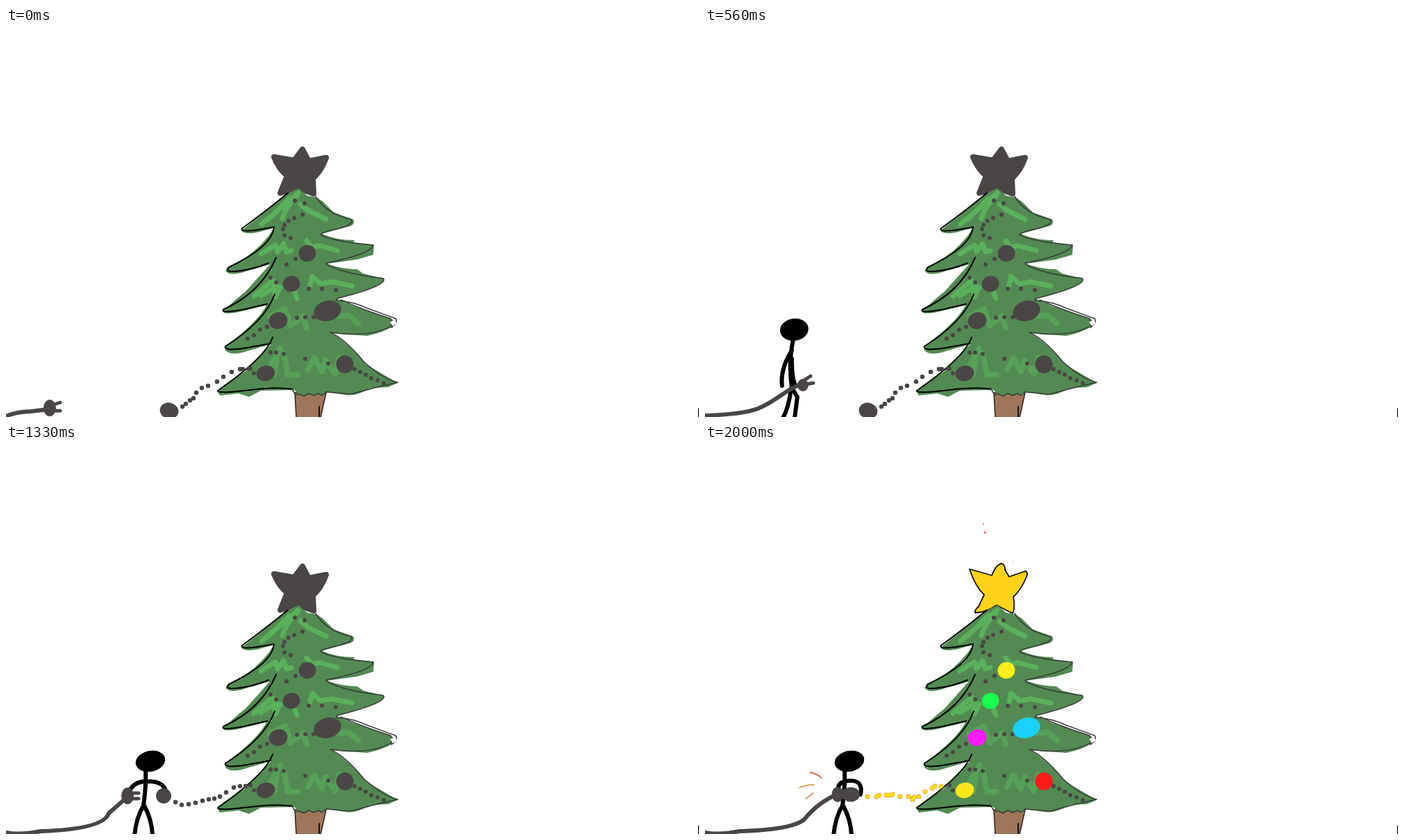
An HTML page that plays this animation: 998x561 px, repeating every 3 s.

```html
<!DOCTYPE html>
<html lang="en">
<head>
<meta charset="utf-8">
<title>Plugging in the tree</title>
<style>
html, body { margin: 0; width: 100%; height: 100%; overflow: hidden; background: #fff; }
svg { display: block; width: 998px; height: 561px; }
path { fill: none; stroke-linecap: round; stroke-linejoin: round; }
.dark { stroke: #4a4645; }
.shape { fill: #4a4645; }
</style>
</head>
<body>
<svg id="stage" viewBox="0 0 998 561"></svg>
<script>
const LOOP = 3000;
const GREY = '#4a4645';
const stage = document.getElementById('stage');

function add(parent, tag, attrs = {}) {
  const el = document.createElementNS('http://www.w3.org/2000/svg', tag);
  for (const key in attrs) el.setAttribute(key, attrs[key]);
  return parent.appendChild(el);
}
const line = (parent, d, stroke, width) =>
  add(parent, 'path', { d, stroke, 'stroke-width': width });
const shape = (parent, d, fill, stroke = 'none', width = 0) =>
  add(parent, 'path', { d, style: `fill:${fill}`, stroke, 'stroke-width': width });
const blob = (parent, [cx, cy, rx, ry, turn = 0], fill) =>
  add(parent, 'ellipse', { cx, cy, rx, ry, fill, transform: `rotate(${turn} ${cx} ${cy})` });
const dots = (parent, points, color, size) =>
  line(parent, points.split(' ').map(p => `M${p}h.01`).join(''), color, size);

// A group that is visible only from one time to another.
function during(from, to) {
  const group = add(stage, 'g');
  group.animate([
    { offset: 0, opacity: from === 0 ? 1 : 0, easing: 'step-end' },
    { offset: from / LOOP, opacity: 1, easing: 'step-end' },
    { offset: to / LOOP, opacity: to === LOOP ? 1 : 0, easing: 'step-end' },
    { offset: 1, opacity: to === LOOP ? 1 : 0 }
  ], { duration: LOOP, iterations: Infinity });
  return group;
}

function drawStars() {
  shape(during(0, 1780),
    'M427 175L436 192L461 187Q455 205 442 217L443 239L421 231L395 238L405 213Q393 204 386 186L415 191Z',
    GREY, GREY, 8);
  shape(during(1780, LOOP),
    'M381 179L413 188Q420 171 428 171Q432 173 432 180L438 190L461 182Q466 183 463 190Q456 208 444 219Q447 235 443 243L420 231Q404 242 389 242Q388 238 394 233L402 216Q389 204 381 179Z',
    '#ffd21a', '#111', 1.8);
}

function drawTree() {
  const tree = add(stage, 'g');
  shape(tree, 'M416 526L418 562H453L461 526Z', '#a0765a', '#2b2422', 1.5);
  line(tree, 'M451 546V562', '#111', 2);
  shape(tree, `M421 231L434 242L447 244L456 250L472 266L500 276Q505 285 490 287L455 297Q475 306 502 306L500 310L530 313
    L529 327L505 334L462 340Q485 348 506 348L514 354L545 362Q546 370 510 380L477 391L500 401L556 420L563 426
    Q548 438 520 444L468 440Q490 452 520 486L564 512L550 518L525 519Q504 532 488 529L462 525L456 530L450 527
    L444 531L437 527L430 531L422 528L415 522L367 523L350 532L335 527L308 530Q302 525 314 515L345 495L368 470L382 456
    L350 465Q325 474 316 465Q314 459 330 448Q365 420 375 400L345 407Q316 415 312 409Q330 392 345 380L380 341
    L345 351Q322 359 316 350Q322 343 345 331Q372 312 386 288L365 294Q343 299 339 292L365 272L390 250L407 238Z`, '#538a53');

  const bright = [
    'M421 238Q395 260 368 283M420 241Q403 257 398 275M408 246L379 275M424 254L435 263L461 276',
    'M367 326L388 313L391 323L400 311L404 323L411 321M433 307L440 316L452 314L477 321',
    'M357 387L384 364L388 388L395 374M367 386L390 372M414 377L419 390M438 371L441 358L453 369L469 366L498 372'
  ];
  const soft = [
    'M404 410L410 430M414 426L428 415L433 432M478 416L493 414L507 426',
    'M374 499L395 462M391 469L386 500M400 469L406 500L420 500',
    'M435 493L444 476L455 496L460 479L474 499L480 475M380 416L402 405'
  ];
  soft.forEach(d => line(tree, d, '#57a057', 8));
  bright.forEach(d => line(tree, d, '#5bb05c', 7));

  const left = [
    'M406 238Q372 266 340 289Q335 297 386 287',
    'M386 287Q384 315 321 345Q314 352 330 351Q354 349 378 339',
    'M389 331Q368 381 313 406Q309 412 342 406L376 398',
    'M387 384Q372 424 316 459Q313 466 342 462L381 455',
    'M384 446Q374 475 305 523Q303 528 352 522Q392 517 412 521'
  ];
  const right = [
    'M446 243Q461 268 497 276Q502 283 480 289Q455 294 453 298Q470 308 529 313Q526 326 461 339',
    'M461 340Q482 354 543 361Q552 371 477 390L475 393Q499 394 520 404L561 419Q565 425 555 432',
    'M482 392Q510 405 554 419L555 428L562 425Q532 448 467 439',
    'M467 439Q489 449 515 481Q542 506 564 511Q531 518 497 528L461 525',
    'M411 519L417 529L423 528L429 531L436 527L443 530L450 527L455 530L461 525'
  ];
  left.forEach(d => line(tree, d, '#000', 2));
  right.forEach(d => line(tree, d, '#39413a', 1.6));
  shape(tree, 'M553 424L560 421L563 426L557 430Z', '#fff');

  dots(tree, '416,249 430,253 427,269 415,274 407,278 401,284 399,290 401,299 410,303 417,333 404,341 381,360 389,367 436,376 455,376 475,378 419,418 431,417 443,417', GREY, 6);
  dots(tree, '376,431 366,435 357,443 348,448 381,468 389,468 400,470 431,477 464,484 502,492 510,496 518,500 526,505 535,508 544,512 357,498 352,491', GREY, 6);
  line(stage, 'M997.5 549V561', '#111', 1.5);
}

function drawBaubles() {
  const baubles = [
    [434, 325, 12.5, 12, '#ffee1a'], [411, 369, 12.5, 11.5, '#1aff50'],
    [392, 422, 13.5, 12, '#ff1aff'], [463, 408, 20, 14.5, '#1ad1ff'],
    [374, 498, 13.5, 11, '#ffe61a'], [488, 485, 12.5, 13, '#ff1a1a']
  ];
  const off = during(0, 1670), on = during(1670, LOOP);
  for (const [x, y, rx, ry, color] of baubles) {
    blob(off, [x, y, rx, ry, -15], GREY);
    blob(on, [x, y, rx, ry, -15], color);
  }
}

const FLOOR_CABLE = 'M0 560Q16 553 35 553L60 550';
const FLOOR_PLUG = { cable: FLOOR_CABLE, plug: [63, 548, 9, 12], prongs: 'M66 544L78 540M66 552H78' };
const STAND = 'M201 470Q202 490 198 520Q188 536 185 563M199 520Q210 540 211 563';
const LOW_SOCKET = [235, 552, 13.5, 11.5, 15];
const LOW_CHAIN = '350,491 341,492 337,492 325,496 313,503 304,510 291,516 282,519 274,526 270,534 265,537 259,542 254,546';
const HIGH_CHAIN = '254,524 262,528 269,528 278,524 291,516 299,511 308,507 317,501 328,494 332,492 337,492 345,492';
const LEVEL_CHAIN = '234,507 247,507 251,505 261,505 266,505 270,504 281,507 293,507 299,511 301,508 308,507 317,500 327,495 331,492 340,492';
const JOINED = {
  head: [208, 456, 21.5, 15, -12],
  limbs: STAND + 'M199 486Q191 488 192 498M201 485Q229 480 224 504',
  cable: 'M0 559Q20 563 50 557Q125 555 143 540Q162 516 190 504',
  plug: [191, 504, 8.5, 11], prongs: 'M194 500H205M194 508H205',
  socket: [210, 504, 13, 10.5], chain: LEVEL_CHAIN
};

const poses = [
  { at: 0, ...FLOOR_PLUG },
  { at: 110, ...FLOOR_PLUG, head: [2, 451, 17, 18],
    limbs: 'M0 467L-4 520M0 476Q14 495 15 518M-4 520L8 543L10 563' },
  { at: 220, ...FLOOR_PLUG, head: [29.5, 449, 17.5, 18.5],
    limbs: 'M28 467Q27 495 22 521M26 474Q9 500 8 520M28 479Q33 505 42 517M23 520Q21 549 11 563M23 521L38 548L39 563' },
  { at: 330, ...FLOOR_PLUG, head: [68, 455, 18, 17],
    limbs: 'M63 471Q55 495 54 524M61 481Q47 503 48 522M61 481Q74 510 66 541M54 523L43 545L38 563M54 523L65 543L63 563' },
  { at: 450, head: [100, 443, 19, 17],
    limbs: 'M99 459Q94 490 96 523M97 474Q82 495 82 520M97 477Q103 505 108 520M96 522L87 545L80 563M96 522L108 541L107 563',
    cable: 'M0 559Q55 558 75 548L108 526', plug: [115, 524, 9, 9], prongs: 'M117 520L128 513M119 526L130 523' },
  { at: 560, head: [128.5, 435, 20.5, 16, -8],
    limbs: 'M127 450Q120 480 125 519M125 465Q108 492 111 516M125 477Q125 505 130 515M124 520Q121 546 112 563M125 519L133 532L129 563',
    cable: 'M0 559Q55 557 76 549C103 538 113 524 135 515', plug: [141, 515, 8, 9], prongs: 'M138 511L152 502M144 514L156 512' },
  { at: 670, head: [168, 448, 19, 15, -6],
    limbs: 'M165 463Q161 490 164 522M164 480Q149 502 148 522M164 482Q178 503 189 519M164 522L151 544L145 563M164 522L175 541L176 563',
    cable: 'M0 558Q70 559 98 548L142 531', plug: [148, 526, 9, 9], prongs: 'M144 521L133 513M149 530L134 529' },
  { at: 780, head: [210, 471, 17.5, 14.5, -5],
    limbs: 'M206 484Q203 504 205 529M205 507L181 529M205 508Q225 519 230 543M205 528Q191 543 166 562M205 529Q213 541 213 563',
    cable: 'M0 557L70 558L105 550L168 541', plug: [175, 535, 9, 9], prongs: 'M177 532L155 521M170 539L155 535' },
  { at: 890, head: [209, 463, 19, 15, -8],
    limbs: 'M203 477Q202 500 201 525M202 495L170 517M202 495L226 505L239 521M201 525L183 545L176 563M201 525L211 543L212 563',
    cable: 'M0 559Q55 557 90 552Q146 543 164 527', plug: [165, 522, 9, 11], prongs: 'M168 518L180 515M168 525H180',
    socket: [243, 529, 11, 12], chain: '253,537 260,537 267,533 275,527 284,521 293,516 302,511 312,504 322,497 333,492 345,491' },
  { at: 1000, head: [208, 456, 21.5, 15, -12],
    limbs: STAND + 'M199 484Q181 489 163 501M199 484Q210 485 220 489L244 498',
    cable: 'M0 559Q20 563 50 557Q149 553 157 522', plug: [156, 511, 8.5, 12.5, 12], prongs: 'M159 506H173M159 514H173',
    socket: [251, 508, 9.5, 12, -25], chain: HIGH_CHAIN },
  { at: 1330, head: [208, 456, 21.5, 15, -12],
    limbs: STAND + 'M199 485Q183 487 178 499M200 485Q228 484 230 500',
    cable: 'M0 559Q20 563 50 557Q141 554 148 531L172 510', plug: [175, 506, 9, 12], prongs: 'M178 502H191M178 510H191',
    socket: [227, 506, 11, 11], chain: '244,515 253,519 263,518 273,516 283,513 292,511 300,510 308,507 317,501 328,494 337,492 345,492' },
  { at: 1440, ...JOINED },
  { at: 1560, ...JOINED, lit: true }
];

function drawPose(pose, end) {
  const g = during(pose.at, end);
  if (pose.head) {
    line(g, pose.limbs, '#000', 6);
    blob(g, pose.head, '#000');
  }
  const chain = pose.chain || LOW_CHAIN;
  if (pose.lit) {
    dots(g, chain, '#e8962a', 7);
    dots(g, chain, '#ffe01a', 5.5);
    line(g, 'M151 472Q161 474 168 480', '#d94a3a', 1.5);
    line(g, 'M136 494Q145 490 157 490', '#d98a2e', 1.5);
    line(g, 'M145 510L156 502', '#e0643a', 1.5);
  } else {
    dots(g, chain, GREY, 6.5);
  }
  line(g, pose.cable, GREY, 6);
  line(g, pose.prongs, GREY, 5);
  blob(g, pose.plug, GREY);
  blob(g, pose.socket || LOW_SOCKET, GREY);
}

// Short strokes around the star, at growing distance.
function drawRays(from, to, inner, outer) {
  const g = during(from, to);
  for (let i = 0; i < 7; i++) {
    const a = Math.PI * (1 + i / 6);
    const at = r => `${425 + r * 1.1 * Math.cos(a)} ${207 + r * Math.sin(a)}`;
    line(g, `M${at(inner)}L${at(outer)}`, i % 2 ? '#e0902e' : '#e04a3a', 1.5);
  }
}

drawStars();
drawTree();
drawBaubles();
poses.forEach((pose, i) => drawPose(pose, i + 1 < poses.length ? poses[i + 1].at : LOOP));
drawRays(1780, 1890, 50, 63);
drawRays(1890, 2000, 66, 90);
const embers = during(2000, LOOP);
line(embers, 'M401 113.5v.5M402.5 125L404 127.5', '#e23b3b', 1.5);
line(embers, 'M444 167.5h.1', '#777', 1.2);
</script>
</body>
</html>
```
